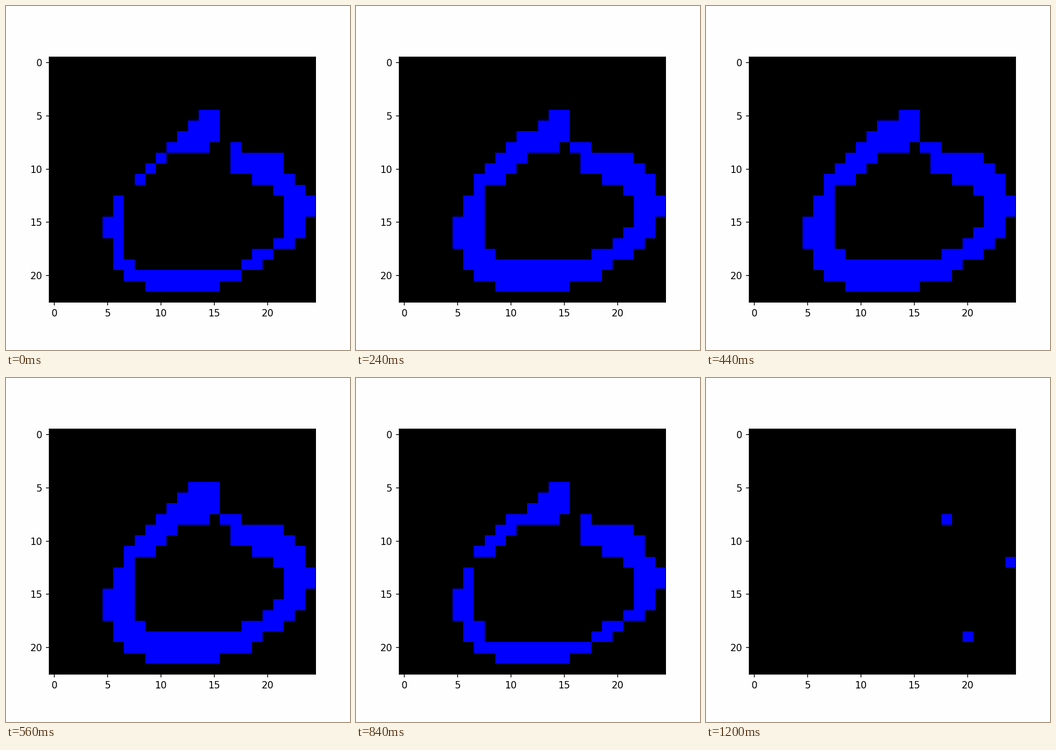
A matplotlib script that plays this animation: 748x748 px, repeating every 1.24 s.

```python
import random

import matplotlib.pyplot as plt
import numpy as np
from matplotlib.animation import FuncAnimation
from matplotlib.path import Path

FRAMES, INTERVAL = 31, 40
ROWS, COLS = 23, 25
SPARSE_START = 25
BLUE = (0, 0, 255)
PAPER = "#fefefe"

CELLS = np.argwhere(np.ones((ROWS, COLS)))[:, ::-1]  # (col, row)

# Outer wall: col, row, and how far a contraction pulls the point inwards.
OUTER = np.array([
    (13.45, 4.6, 0), (15.2, 4.6, 0), (15.2, 7.2, 0), (17.2, 7.8, 0),
    (17.6, 8.6, 0), (21.4, 8.8, .35), (24.4, 12.7, .2), (24.1, 14.2, 0),
    (23.4, 16.4, .3), (18.2, 20.2, .6), (15.2, 21.2, 0), (12.5, 21.2, 0),
    (8.8, 21.2, 0), (6.2, 19.6, 0), (4.8, 17.2, .3), (4.8, 14.8, 0),
    (6.8, 10.8, .3)])
TOP, BOTTOM = 0, 11
CENTRE = np.array([14.5, 14])

# Inner wall: grows about its anchor as the ring gets thinner.
INNER = np.array([
    (15, 7.8), (16.3, 8.3), (16.4, 10.4), (18.4, 10.8), (20.4, 11.8),
    (21.3, 12.8), (21.3, 15.2), (17.4, 18.3), (8.7, 18.3), (7.7, 17.2),
    (7.7, 11.8), (9.4, 10.8), (11.7, 8.7), (14.7, 8.5)])
ANCHOR = np.array([17, 11])
GROWTH = np.array([.09, .13])

LAST = [(18, 8), (24, 12), (20, 19)]


def pulse(frame, peak, width):
    return np.exp(-((frame - peak) / width) ** 2)


def ring(inner, outer, peak=0, bump=0, jitter=0):
    """Mask of the cells between both walls, squeezed by 0 to 1."""
    wall = OUTER[:, :2].copy()
    inward = CENTRE - wall
    inward /= np.linalg.norm(inward, axis=1, keepdims=True)
    wall += inward * OUTER[:, 2:] * outer + jitter
    wall[TOP, 0] -= .6 * peak
    wall[BOTTOM, 1] += 2.2 * bump
    hole = ANCHOR + (INNER - ANCHOR) * (1 + GROWTH * inner)
    return Path(wall).contains_points(CELLS) & ~Path(hole).contains_points(CELLS)


def dense(frame):
    squeeze = np.interp(frame, [0, 6, 14, 18, SPARSE_START], [1, 0, 0, .8, 1])
    jitter = np.random.default_rng(frame).normal(0, .04, (len(OUTER), 2))
    mask = ring(squeeze, squeeze ** 2, pulse(frame, 18, 2),
                pulse(frame, 8, 1.5), jitter)
    return CELLS[mask]


def sparse(frame):
    """Rim cells drop out one by one while the last few appear."""
    rim = [tuple(c) for c in CELLS[ring(0, 0) & ~ring(.8, 1)]]
    random.Random(4).shuffle(rim)
    t = (frame - SPARSE_START) / (FRAMES - 1 - SPARSE_START)
    return rim[:round(len(rim) * (1 - t))] + LAST[:int(len(LAST) * t)]


def picture(frame):
    img = np.zeros((ROWS, COLS, 3), dtype=np.uint8)
    for c, r in dense(frame) if frame < SPARSE_START else sparse(frame):
        img[r, c] = BLUE
    return img


fig, ax = plt.subplots(figsize=(5, 5), dpi=149.6, facecolor=PAPER)
image = ax.imshow(picture(0), interpolation="nearest")
ax.set_xticks(range(0, 21, 5))
ax.set_yticks(range(0, 21, 5))


def update(frame):
    image.set_data(picture(frame))
    return [image]


anim = FuncAnimation(fig, update, frames=FRAMES, interval=INTERVAL,
                     repeat=True, repeat_delay=0)
plt.show()
```
